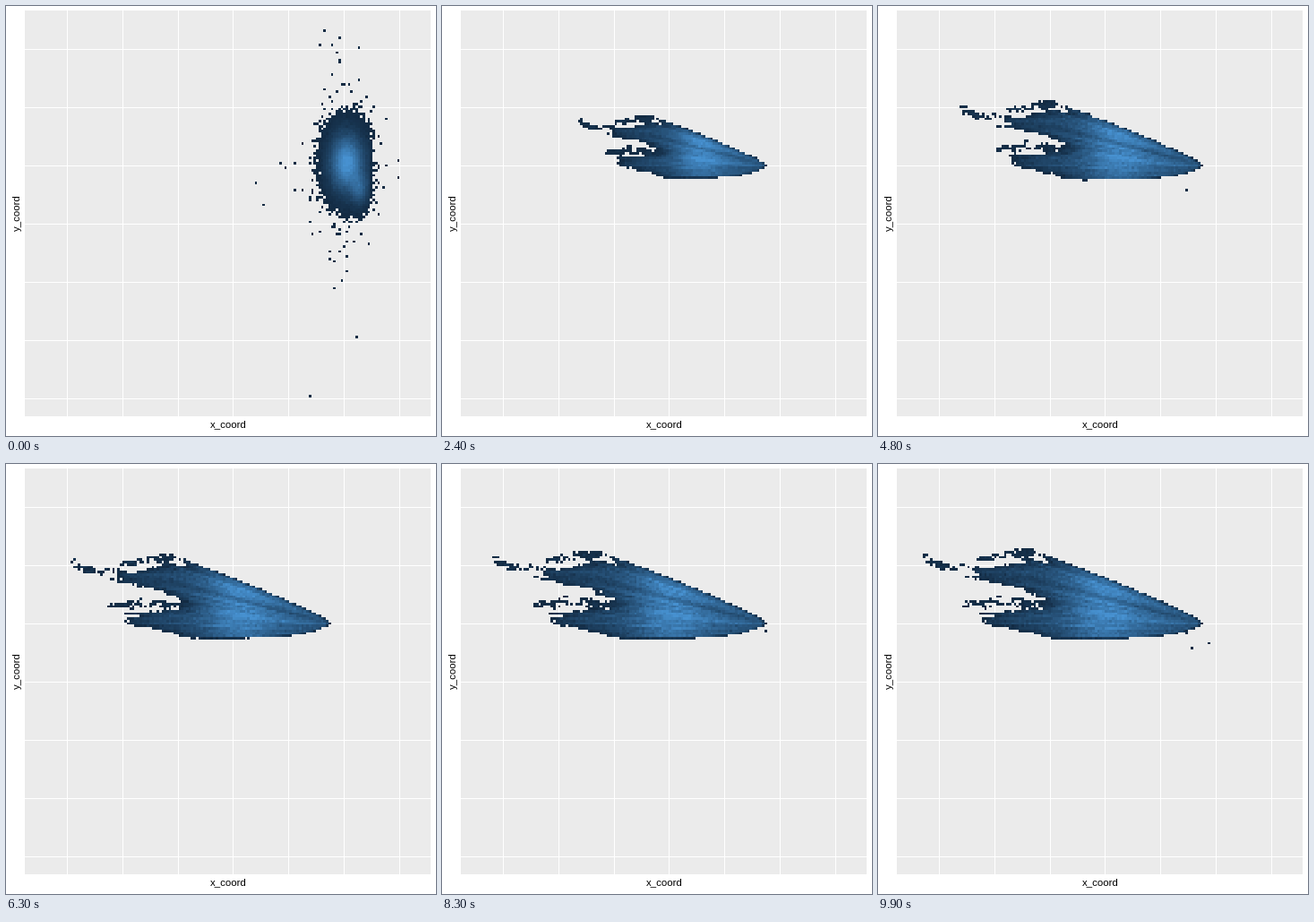
Write a matplotlib script that moves like this. It is 480x480 px and loops after 10 s.

```python
import numpy as np
import matplotlib.pyplot as plt
from matplotlib.animation import FuncAnimation
from matplotlib.patches import Rectangle

SIZE, FRAMES, STEP = 480, 100, 100
BINS = 150
X0, X1, Y0, Y1 = 42, 453, 26, 437
TIP = np.array([361.0, 178.0])
DARK = np.array([0x13, 0x2B, 0x43]) / 255
LIGHT = np.array([0x47, 0x91, 0xD0]) / 255
rng = np.random.default_rng(7)


def blob(n, center, sd, draw=rng.normal):
    return center + draw(size=(n, 2)) * sd


def plume(n, streaks=60):
    """Settled shape, relative to the tip: streaks fanning out to the left."""
    mid = (np.arange(streaks) + 0.5) / streaks
    weight = np.exp(0.42 * rng.normal(size=streaks)) * (1.2 - 0.4 * mid)
    weight *= 0.3 + 0.7 * np.sqrt(np.sin(np.pi * mid))
    reach = 218 + 42 * np.cos(4 * np.pi * (mid - 0.3)) - 20 * mid
    reach += rng.normal(0, 10, streaks)
    k = rng.choice(streaks, n, p=weight / weight.sum())
    v = (k + rng.random(n)) / streaks
    d = reach[k] * rng.beta(2, 1.8, n)
    core = rng.normal(112, 25, n)
    use = (rng.random(n) < 0.4) & (core > 0) & (core < reach[k])
    d = np.where(use, core, d)
    top = -np.minimum(0.935 * d ** 0.85, 84)
    low = 16.5 * (1 - np.exp(-d / 30))
    return np.column_stack([-d, top + (low - top) * v])


def strand(a, b, n):
    """Loose clumps of points along the line from a to b."""
    u = np.repeat(rng.random(n), 5)[:, None]
    line = np.array(a) * (1 - u) + np.array(b) * u
    lift = np.repeat(rng.normal(0, 2.5, n), 5)
    line[:, 1] += lift
    return line + rng.normal(size=line.shape) * [3, 0.8] - TIP


def cloud(n):
    """Starting blob with wide tails and a bulge at the lower right."""
    bulge = n // 8
    core = np.vstack([blob(bulge, [394, 202], [5.5, 10]),
                      blob(n - bulge, [380.5, 175], [9.8, 16.5])])
    over = np.maximum(core[:, 0] - 404, 0)
    core[:, 0] -= 0.6 * over
    p = rng.permutation(core)
    lone = np.array([(340, 436), (280, 196), (356, 27)])
    loose = np.vstack([lone, blob(290, [378, 176], [13, 33], rng.laplace),
                       blob(700, [379, 175], [13.5, 25])])
    p[:len(loose)] = loose
    return p


settled = np.vstack([
    plume(80000),
    strand((44, 108), (110, 119), 14),
    strand((108, 121), (150, 124), 16),
    strand((112, 104), (176, 97), 22),
    strand((98, 157), (185, 156), 24),
])
start = cloud(len(settled))


def points(i):
    t = i * STEP / 1000
    s = 1.03 * (1 - 0.75 * np.exp(-0.315 * t))
    hold = np.exp(-t / 0.38)
    x, y = settled.T
    rel = np.column_stack([x * s, y * np.where(y > 0, np.sqrt(s), s)])
    p = (TIP + rel) * (1 - hold) + start * hold
    if i > 8:
        r = np.random.default_rng(500 + i)
        strays = r.normal(size=(r.integers(0, 4), 2)) * [7, 8] + [354, 200]
        p = np.vstack([p, strays])
    return p


def tiles(i):
    p = points(i)
    count = np.histogram2d(p[:, 1], p[:, 0], BINS, [[Y0, Y1], [X0, X1]])[0]
    full = count > 0
    ref = np.percentile(count[full], 99.3)
    c = np.clip((count - 1) / (ref - 1), 0, 1)[..., None] ** 0.65
    return np.dstack([DARK + (LIGHT - DARK) * c, full])


fig = plt.figure(figsize=(4.8, 4.8), dpi=100, facecolor="white")
ax = fig.add_axes([0, 0, 1, 1])
ax.axis("off")


def box(x, y, w, h, color):
    ax.add_patch(Rectangle((x, y), w, h, fc=color, lw=0, antialiased=False, zorder=0))


box(21, 5, 453, 453, "#EBEBEB")
for k in range(7):
    box(int(68.4 + 61.8 * k), 5, 1, 453, "white")
    box(21, 48 + 65 * k, 453, 1, "white")

label = dict(family="Liberation Sans", size=8.2, color="black", ha="center", va="center")
ax.text(248, 467.5, "x_coord", **label)
ax.text(12.5, 231, "y_coord", rotation=90, **label)

img = ax.imshow(tiles(0), extent=(X0, X1, Y1, Y0), interpolation="nearest",
                aspect="auto", zorder=2)
ax.set_xlim(0, SIZE)
ax.set_ylim(SIZE, 0)


def update(i):
    img.set_data(tiles(i))
    return [img]


anim = FuncAnimation(fig, update, frames=FRAMES, interval=STEP, repeat=True,
                     repeat_delay=0, blit=False)
plt.show()
```
